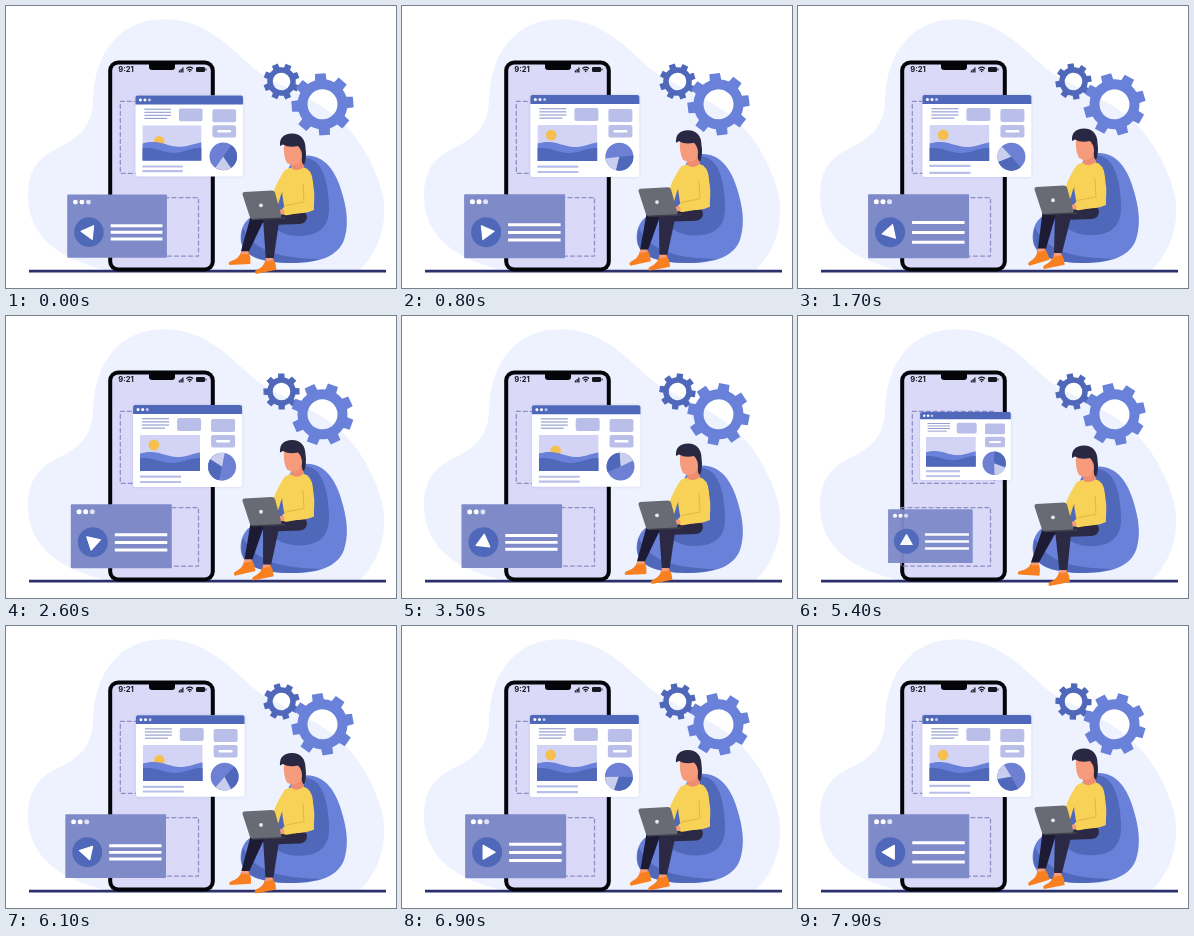
An HTML page with a canvas that plays this animation: 390 px wide and 282 px high, repeating every 8000 ms.

```html
<!DOCTYPE html>
<html>
<head>
<meta charset="utf-8">
<style>
html, body { margin: 0; width: 100%; height: 100%; overflow: hidden; background: #fff; }
canvas { display: block; width: 390px; height: 282px; }
</style>
</head>
<body>
<canvas id="stage"></canvas>
<script>
const W = 390, H = 282, LOOP = 8000, CYCLE = 6000;
const canvas = document.getElementById('stage');
const dpr = window.devicePixelRatio || 1;
canvas.width = W * dpr;
canvas.height = H * dpr;
const c = canvas.getContext('2d');

const DARK = '#4f68b9', MID = '#6981d9', PALE = '#b9bfe9', HAIR = '#2a2743',
  LEG_BACK = '#1d1a33', LEG_FRONT = '#2c2945', SKIN = '#f69b7b',
  YELLOW = '#f8d257', ORANGE = '#f98020', WHITE = '#fff', BLACK = '#050509';

const mix = (a, b, p) => a + (b - a) * p;
const ease = p => (1 - Math.cos(Math.PI * Math.min(1, Math.max(0, p)))) / 2;
const ramp = (t, from, to) => ease((t - from) / (to - from));
const turn = t => t / CYCLE * Math.PI * 2;
const pulse = u => Math.cos(2 * turn(u - 1700));

function rect(x, y, w, h, r, fill) {
  c.beginPath();
  c.roundRect(x, y, w, h, r);
  c.fillStyle = fill;
  c.fill();
}
function disc(x, y, r, fill) {
  c.beginPath();
  c.arc(x, y, r, 0, Math.PI * 2);
  c.fillStyle = fill;
  c.fill();
}
function shape(d, fill) {
  c.fillStyle = fill;
  c.fill(new Path2D(d));
}
function line(d, color, width) {
  c.strokeStyle = color;
  c.lineWidth = width;
  c.lineCap = c.lineJoin = 'round';
  c.stroke(new Path2D(d));
}
function bar(x, y, w, h, fill) { rect(x, y - h / 2, w, h, 0, fill); }

// Runs draw() in a w x h box centred on x, y
function placed(x, y, w, h, scale, draw) {
  c.save();
  c.translate(x, y);
  c.scale(scale, scale);
  c.translate(-w / 2, -h / 2);
  draw();
  c.restore();
}

function backdrop() {
  c.fillStyle = WHITE;
  c.fillRect(0, 0, W, H);
  shape('M100 264 C60 255 22 234 22 190 C22 160 36 150 54 141 C76 130 86 118 87 95 ' +
    'C88 66 96 42 118 25 C140 10 172 10 196 22 C226 37 238 58 262 72 ' +
    'C284 84 300 90 318 102 C346 120 366 150 376 186 C382 212 376 242 354 264 Z', '#edf2fe');
}

function gear(x, y, tip, root, hole, angle, fill) {
  c.save();
  c.translate(x, y);
  c.rotate(angle);
  c.beginPath();
  for (let i = 0; i < 8; i++) {
    const a = i * Math.PI / 4;
    for (const [off, r] of [[-0.23, root], [-0.17, tip], [0.17, tip], [0.23, root]])
      c.lineTo(r * Math.cos(a + off), r * Math.sin(a + off));
    c.arc(0, 0, root, a + 0.23, a + Math.PI / 4 - 0.23);
  }
  c.closePath();
  c.moveTo(hole, 0);
  c.arc(0, 0, hole, 0, Math.PI * 2, true);
  c.fillStyle = fill;
  c.fill();
  c.restore();
}

function gears(t) {
  const a = turn(t - 1700);
  gear(275.5, 75.5, 18.3, 14.3, 8.8, a - 0.17, DARK);
  gear(316.5, 98.3, 31.3, 25, 15, -a - 0.28, MID);
}

function phone() {
  rect(102.2, 54.5, 106.6, 211, 10, BLACK);
  rect(106.2, 58.5, 98.6, 203, 6, '#dbd9f8');
  rect(143, 55, 26, 9, 3, BLACK);
  c.fillStyle = '#16161f';
  c.font = '700 7.6px Inter, sans-serif';
  c.fillText('9:21', 112.2, 66);
  for (let i = 0; i < 3; i++) rect(172.8 + i * 1.7, 64.4 - i * 1.5, 1.3, 2 + i * 1.5, 0, '#16161f');
  line('M180.8 62.3 Q183.7 60 186.6 62.3 M182 64 Q183.7 62.7 185.4 64', '#16161f', 1.2);
  disc(183.7, 65.4, 0.8, '#16161f');
  rect(190, 61, 9, 5, 1.3, '#16161f');
  rect(199.5, 62.5, 1, 2, 0, '#16161f');
  c.save();
  c.setLineDash([4, 3]);
  c.strokeStyle = '#8d90c6';
  c.lineWidth = 1.3;
  c.strokeRect(114.3, 95.3, 82, 72);
  c.strokeRect(103, 191.6, 89.5, 58.5);
  c.restore();
}

function wave(y, amp, phase, fill) {
  c.beginPath();
  c.moveTo(7, 66);
  for (let x = 7; x <= 67; x += 2)
    c.lineTo(x, y + amp * Math.sin((x - 7) / 60 * Math.PI * 2.2 + phase));
  c.lineTo(67, 66);
  c.fillStyle = fill;
  c.fill();
}

function picture(u) {
  const up = u < 900 ? ramp(u + CYCLE, 4700, 6900)
    : u < 2800 ? 1
    : u < 4700 ? 1 - ramp(u, 2800, 4600)
    : ramp(u, 4700, 6900);
  const sunY = mix(28, 10, up);
  c.save();
  c.beginPath();
  c.rect(7, 30, 60, 36);
  c.clip();
  rect(7, 30, 60, 36, 0, '#d3d4f5');
  disc(7 + 13.8 + (sunY - 10) * 0.5, 30 + sunY, 5.4, '#f5c04f');
  wave(49.5, 2.5, 3.5, MID);
  wave(55.5, 2.5, 4.2, DARK);
  c.restore();
}

function pie(x, y, r, angle) {
  disc(x, y, r, '#6d80d3');
  const slice = (from, to, fill) => {
    c.beginPath();
    c.moveTo(x, y);
    c.arc(x, y, r, angle + from, angle + to);
    c.fillStyle = fill;
    c.fill();
  };
  slice(-0.6, 0.6, '#c9ceef');
  slice(-2.5, -0.6, DARK);
}

function browser(u) {
  c.save();
  c.shadowColor = 'rgba(80,90,160,.18)';
  c.shadowBlur = 3 * dpr;
  rect(0, 0, 109, 82, 2, WHITE);
  c.restore();
  rect(0, 0, 109, 9, [2, 2, 0, 0], DARK);
  for (let i = 0; i < 3; i++) disc(5 + i * 4.6, 4.6, 1.5, i < 2 ? WHITE : '#c3c9ee');
  for (let i = 0; i < 4; i++) bar(9, 13.8 + i * 3.1, i < 3 ? 27 : 23, 0.9, '#7480c0');
  rect(44, 13, 24, 13, 2, PALE);
  rect(78, 14, 24, 13, 2, PALE);
  rect(78, 30, 24, 12.5, 2, PALE);
  rect(83, 35, 14, 2.5, 1, WHITE);
  picture(u);
  const gap = 2.9 + 0.6 * pulse(u);
  bar(7, 74.3 - gap, 41, 2.2, PALE);
  bar(7, 74.3 + gap, 41, 2.2, PALE);
  pie(89, 61.7, 14, Math.PI / 2 + turn(u));
}

function player(u) {
  rect(0, 0, 101, 64, 1, '#7f8ac9');
  for (let i = 0; i < 3; i++) disc(8.3 + i * 6.6, 7.6, 2.5, i < 2 ? WHITE : '#dfe2f6');
  disc(22, 38, 15, DARK);
  c.save();
  c.translate(22, 38);
  c.rotate(turn(u - 900));
  c.beginPath();
  for (let i = 0; i < 3; i++) {
    const a = i * Math.PI * 2 / 3;
    c.lineTo(8 * Math.cos(a), 8 * Math.sin(a));
  }
  c.closePath();
  c.fillStyle = c.strokeStyle = WHITE;
  c.lineWidth = 1.2;
  c.lineJoin = 'round';
  c.fill();
  c.stroke();
  c.restore();
  const gap = 8.2 + 1.6 * pulse(u);
  for (let i = -1; i <= 1; i++) bar(44, 38.2 + i * gap, 52.5, 3, WHITE);
}

function panels(u) {
  // out: 0 inside the phone, 1 popped forward; drift: sideways sway
  const out = u < 200 ? ramp(u + CYCLE, 4800, 6200)
    : u < 3400 ? 1
    : u < 4700 ? 1 - ramp(u, 3400, 4700)
    : ramp(u, 4800, 6200);
  const drift = u < 1850 ? ramp(u, 200, 1850) : 1 - ramp(u, 1850, 3400);
  placed(mix(156.5, 184.6, out) - 5.8 * drift, 130, 109, 82, mix(0.725, 1, out), () => browser(u));
  c.globalAlpha = mix(0.93, 1, out);
  placed(mix(147.2, 109.2, out) + 11.6 * drift, 220.2, 101, 64, mix(0.735, 1, out), () => player(u));
  c.globalAlpha = 1;
}

function beanbag(s) {
  c.save();
  c.translate(0, 257);
  c.scale(1, 1 - 0.018 * s);
  c.translate(0, -257);
  shape('M302 149 C322 150 332 170 337 190 C342 208 342 222 338 234 C332 250 314 257 288 257 ' +
    'C258 257 238 252 235 236 C233 220 242 208 257 207 C276 204 276 180 281 166 C285 154 290 149 302 149 Z', MID);
  shape('M284 162 C289 149 305 148 313 159 C320 169 322 182 323 198 ' +
    'C324 216 318 226 302 229 C284 232 268 226 262 214 Z', DARK);
  shape('M237 222 C232 240 240 250 258 254 C274 258 296 258 314 253 C286 252 250 250 237 222 Z', DARK);
  c.restore();
}

function shoe([x, y], angle) {
  c.save();
  c.translate(x, y);
  c.rotate(angle);
  shape('M-4 -3 L4 -3 Q6 3 5 9 L-16 9 Q-18 6 -14 5 Q-6 3 -4 -3 Z', ORANGE);
  rect(-3.4, -5, 6.8, 4, 0, SKIN);
  c.restore();
}

// Thigh from hip to knee, then a shin tapering to the ankle
function leg(hip, knee, [x, y], width, fill) {
  line(`M${hip} L${knee}`, fill, width);
  const [kx, ky] = knee, r = width / 2;
  shape(`M${kx - r} ${ky} L${x - 4} ${y - 4} L${x + 4} ${y - 4} L${kx + r + 2} ${ky + 4} Z`, fill);
}

function person(s) {
  const dy = 4 * (s - 0.26);
  const back = [240 - 4 * s, 248.7 + 2.2 * s];
  const front = [263 + 3 * s, 255 + 4 * s];

  shoe(back, -0.1 + 0.2 * s);
  leg([290, 211 + dy], [250, 211 + dy], back, 11, LEG_BACK);
  shoe(front, -0.2);
  leg([294, 211 + dy], [264, 212 + dy], front, 14, LEG_FRONT);

  c.save();
  c.translate(0, dy);
  line('M281 168 Q272 182 269 195', YELLOW, 8);
  shape('M279 164 Q287 160 297 161 Q306 163 307 176 L308 204 Q297 209 280 207 Q275 190 276 174 Z', YELLOW);
  shape('M285 150 L297 150 L298 161 Q291 167 285 162 Z', '#ee8d70');
  shape('M278 137 L296 137 Q299 150 293 157 Q287 161 281 157 Q277 150 278 137 Z', SKIN);
  shape('M274 140 Q273 128 286 127.5 Q299 128 299.5 142 Q301 152 298 159 Q295 157 296 150 ' +
    'Q296 144 292 140 Q283 142 277 138.5 Z', HAIR);
  line('M301 172 Q306 188 303 201 L280 205', YELLOW, 8.5);
  line('M297 178 L298 196 L280 199.5', '#dfb742', 1);
  line('M276 206 L270 207', SKIN, 5);
  shape('M238 186 L266 184.5 Q268 184.5 269 186.5 L275.5 210.5 Q275.5 212.5 273 212.5 ' +
    'L247 213.5 Q245 213.5 244 211.5 L236.5 188.5 Q236 186.5 238 186 Z', '#696b74');
  line('M247 213.4 L279 212', '#3f414a', 1.4);
  disc(255, 199.3, 1.9, '#e9eaf0');
  c.restore();
}

function draw(t) {
  const u = t % CYCLE;
  const s = Math.cos(turn(t - 4750));
  c.setTransform(dpr, 0, 0, dpr, 0, 0);
  backdrop();
  gears(t);
  rect(23, 263.8, 357, 2.6, 0, '#2c316d');
  phone();
  panels(u);
  beanbag(s);
  person(s);
}

const start = performance.now();
function tick() {
  draw((performance.now() - start) % LOOP);
  requestAnimationFrame(tick);
}
tick();
</script>
</body>
</html>
```
